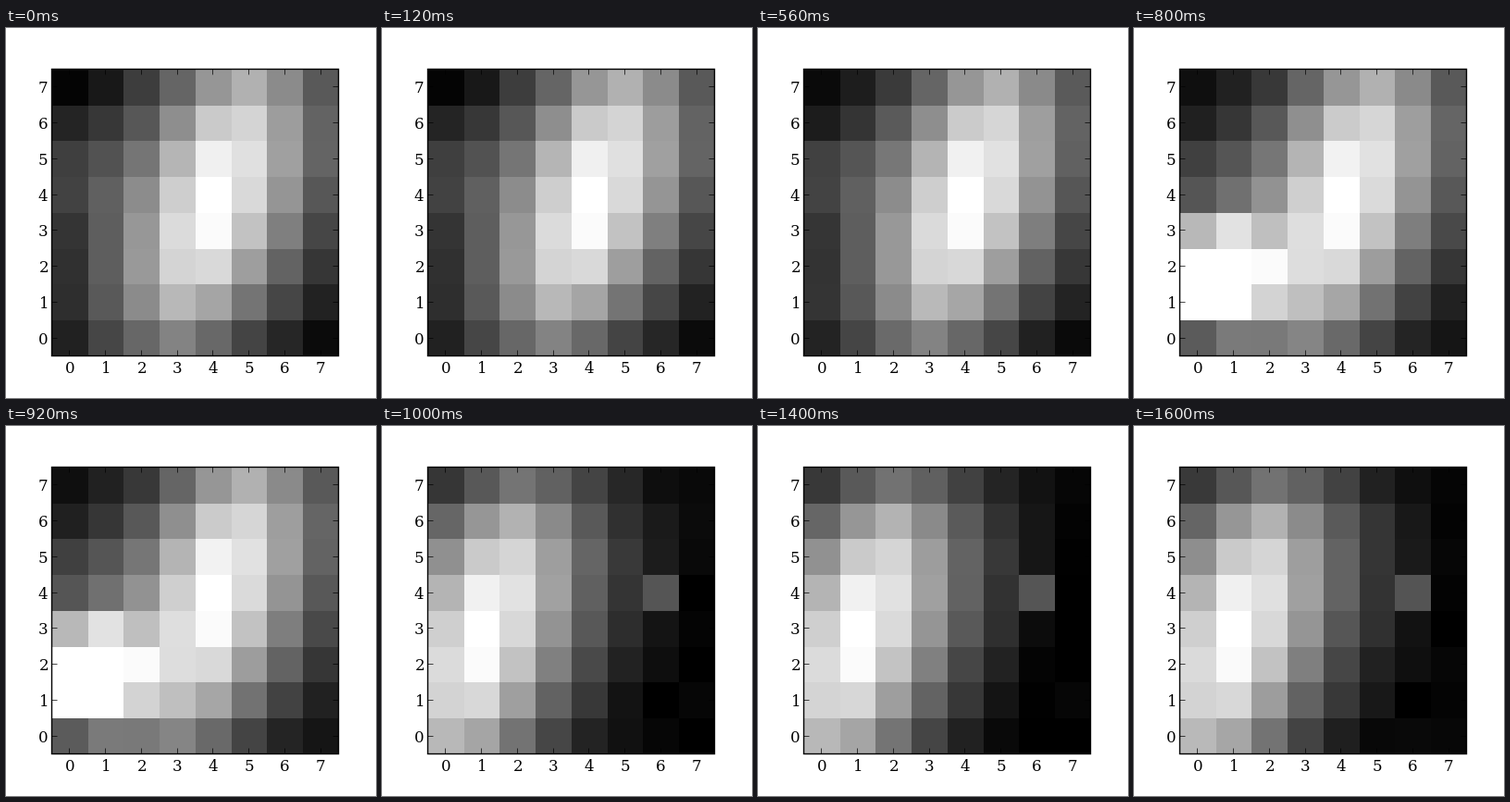
Animation, 400 px wide and 400 px high, one loop 1800 ms. Source, as an HTML page with a canvas:

```html
<!DOCTYPE html>
<html lang="en">
<head>
<meta charset="utf-8">
<title>Grey heat map</title>
<style>
html, body { margin: 0; width: 100%; height: 100%; overflow: hidden; background: #fff; }
canvas { display: block; }
</style>
</head>
<body>
<canvas id="stage" width="400" height="400"></canvas>
<script>
const ctx = document.getElementById('stage').getContext('2d');
const N = 8, LEFT = 50, TOP = 45, SIZE = 310, CELL = SIZE / N;
const STEP = 200, LOOP = 1800;
const HIT = 800, JUMP = 1000;

// Round glow of a given height around a point of the field.
const spot = (x, y, cx, cy, height, spread) =>
  height * Math.exp(-((x - cx) ** 2 + (y - cy) ** 2) / spread);

// Slanted ridge, brightest near row 4, with a faint left shoulder and one hot cell.
function field(x, y) {
  const peak = 262 * (1 - 0.033 * (y - 3.9) ** 2);
  const away = Math.abs(x - (3 + 0.27 * y));
  const ridge = (peak + 14) * Math.exp(-0.2 * away ** 1.5) - 14;
  return Math.max(0, ridge) + spot(x, y, 0, 4.7, 38, 1.6) + spot(x, y, 9, 5, 62, 0.1);
}

function random(x, y, seed) {
  const n = Math.sin(x * 12.9898 + y * 78.233 + seed * 37.719) * 43758.5453;
  return n - Math.floor(n);
}

// Sensor flicker, strongest in the dark.
const flicker = (x, y, seed, v) =>
  (random(x, y, seed) * 2 - 1) * (1 + 8 * Math.exp(-v / 40));

function brightness(col, row, t) {
  const moved = t >= JUMP;
  const x = col + (moved ? 3 : 0), y = row + (moved ? 1 : 0);
  // One noise sample is held from the first step until the hit.
  const seed = t >= STEP && t < HIT ? 1 : Math.floor(t / STEP);
  let v = field(x, y);
  if (t >= HIT && !moved) v += spot(x, y, 0.5, 1.75, 380, 1.7);
  v += flicker(x, y, seed, v);
  return Math.round(Math.min(255, Math.max(0, v)));
}

const edge = (origin, i) => Math.ceil(origin + i * CELL - 0.5);
const middle = (origin, i) => origin + (i + 0.5) * CELL;

function drawCells(t) {
  for (let r = 0; r < N; r++) {
    const y = edge(TOP, N - 1 - r), h = edge(TOP, N - r) - y;
    for (let c = 0; c < N; c++) {
      const x = edge(LEFT, c), v = brightness(c, r, t);
      ctx.fillStyle = `rgb(${v},${v},${v})`;
      ctx.fillRect(x, y, edge(LEFT, c + 1) - x, h);
    }
  }
}

function line(x1, y1, x2, y2) {
  ctx.beginPath();
  ctx.moveTo(x1, y1);
  ctx.lineTo(x2, y2);
  ctx.stroke();
}

// Places a label by its ink: anchor 0.5 centres it on x, anchor 1 ends it at x.
function label(text, x, baseline, anchor) {
  const m = ctx.measureText(text);
  const left = -m.actualBoundingBoxLeft, right = m.actualBoundingBoxRight;
  ctx.fillText(text, Math.round(x - left - (right - left) * anchor), baseline);
}

function drawAxes() {
  const x0 = LEFT - 0.5, y0 = TOP - 0.5, x1 = x0 + SIZE, y1 = y0 + SIZE, tick = 6;
  ctx.strokeStyle = ctx.fillStyle = '#000';
  ctx.lineWidth = 0.7;
  ctx.font = '16.67px "DejaVu Serif", "Noto Serif", serif';
  for (let i = 0; i < N; i++) {
    const mx = middle(LEFT, i), my = middle(TOP, N - 1 - i);
    const tx = Math.round(mx) - 0.5, ty = Math.round(my) - 0.5;
    line(tx, y0, tx, y0 + tick);
    line(tx, y1, tx, y1 - tick);
    line(x0, ty, x0 + tick, ty);
    line(x1, ty, x1 - tick, ty);
    label(String(i), mx, 373, 0.5);
    label(String(i), 44.8, Math.round(my + 6), 1);
  }
  ctx.lineWidth = 1.39;
  ctx.strokeRect(x0, y0, SIZE, SIZE);
}

function draw(now) {
  ctx.fillStyle = '#fff';
  ctx.fillRect(0, 0, 400, 400);
  drawCells(now % LOOP);
  drawAxes();
}

const began = performance.now();
function play() {
  draw(performance.now() - began);
  requestAnimationFrame(play);
}
play();
</script>
</body>
</html>
```
